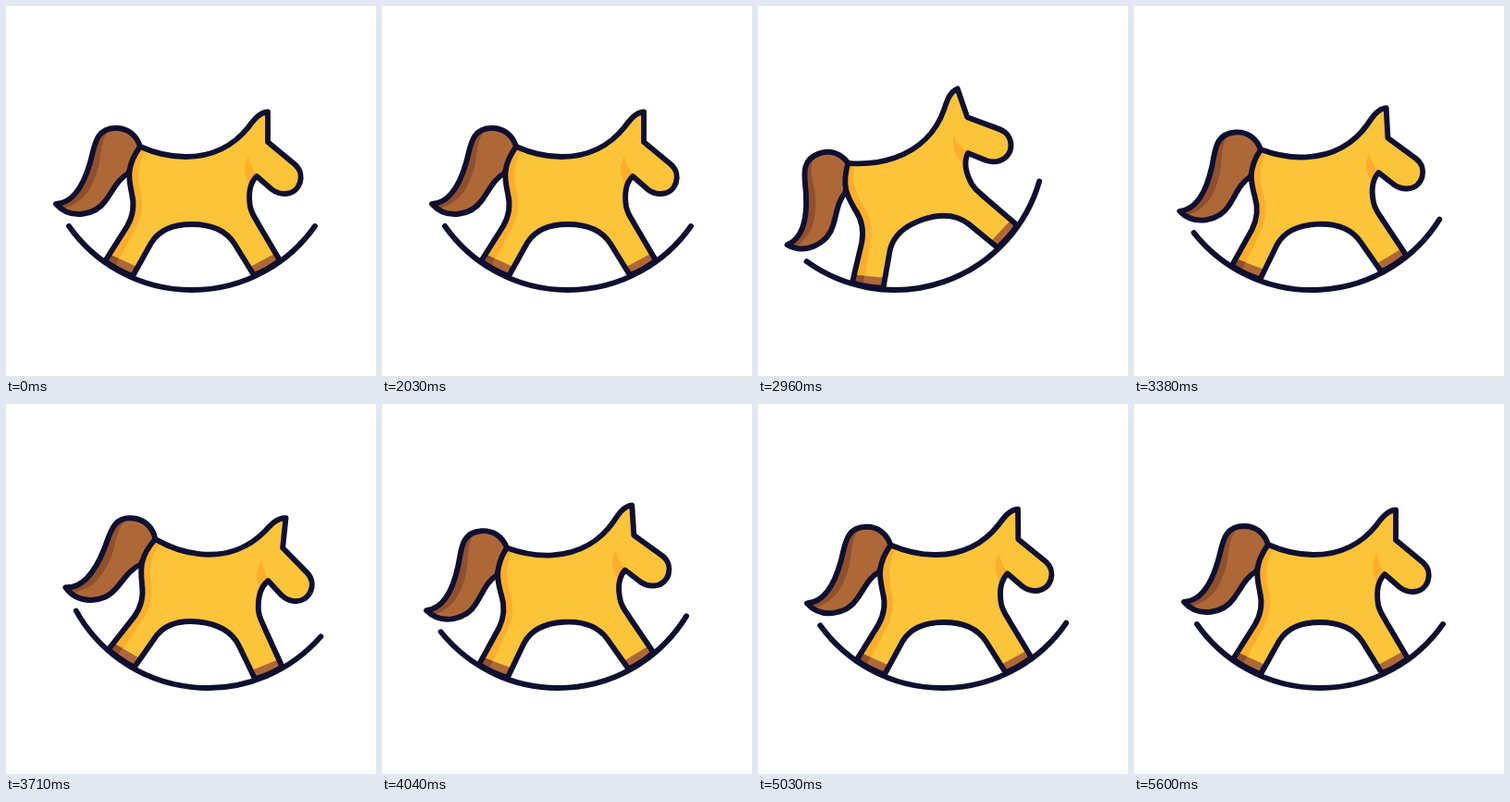
Animation, 400 px wide and 400 px high, one loop 5.66 s. Source, as an HTML page:

```html
<!DOCTYPE html>
<html lang="en">
<head>
<meta charset="utf-8">
<title>Rocking horse</title>
<style>
  html, body { margin: 0; width: 100%; height: 100%; overflow: hidden; background: #fff; }
  svg { display: block; width: 100%; height: 100%; }
  .line { fill: none; stroke: #0f0f30; stroke-width: 5.9; stroke-linecap: round; stroke-linejoin: round; }
</style>
</head>
<body>
<svg viewBox="0 0 400 400">
  <defs>
    <path id="tail" d="M54 214C75 213 85 190 91 169C96 152 96 132 119 132C131 132 141 139 145 152L132 181C121 187 116 199 108 210C97 226 70 232 54 214Z"/>
    <path id="body" d="M145 152C163 160 179 163 194 163C224 163 247 150 262 131C268 123 274 115 283 114.500V147L312 171C325 182 318 203 301 203C295 203 291 201 287 198L271 184C263 192 262 205 264 217C266 226 270 230 273 236L296 275Q283 285 268 291L247 257C238 243 222 236 201 236C180 236 165 243 157 256L137 292Q121 286 107 276L131 238C139 224 138 211 136 203C133 188 129 174 145 152Z"/>
    <clipPath id="inTail"><use href="#tail"/></clipPath>
    <clipPath id="inBody"><use href="#body"/></clipPath>
  </defs>
  <g id="horse">
    <use href="#tail" fill="#ae6838"/>
    <path clip-path="url(#inTail)" fill="#90502c" d="M50 205L85 150L113 133C100 146 104 164 99 178C92 199 84 214 58 220Z"/>
    <use href="#tail" class="line"/>
    <use href="#body" fill="#fcc438"/>
    <g clip-path="url(#inBody)">
      <path fill="#fbae2a" d="M154 152C141 168 142 186 146 203C150 222 143 236 136 248L115 288L90 270L120 150ZM262 162C255 176 258 187 264 194L272 184C267 177 264 171 262 162Z"/>
      <path fill="#ae6838" d="M111 268L142 282L136 300L98 285ZM292 267L262 283L268 300L305 280Z"/>
      <path fill="#90502c" d="M111 268L122 273L114 288L96 284Z"/>
    </g>
    <use href="#body" class="line"/>
    <path class="line" d="M68 238A162.700 162.700 0 0 0 334 238"/>
  </g>
</svg>
<script>
  const LOOP = 5660, CX = 201, CY = 144.3;
  // [time in ms, tilt in degrees, sideways roll] at each turning point
  const swings = [[0, 0, 0], [2015, 0, 0], [2461, 6.6, 18.6], [3050, -20.2, -56.5],
    [3618, 6.6, 18.6], [4198, -5.5, -16], [4643, 3.5, 8.4], [5140, -1, -2.8],
    [5600, 0, 0], [LOOP, 0, 0]];
  const horse = document.getElementById('horse');

  const ease = u => {
    const smooth = u * u * (3 - 2 * u);
    const smoother = u * u * u * (10 - 15 * u + 6 * u * u);
    return (smooth + smoother) / 2;
  };

  function poseAt(t) {
    const i = swings.findIndex(([time]) => time > t);
    const from = swings[i - 1], to = swings[i];
    const e = ease((t - from[0]) / (to[0] - from[0]));
    const mix = k => from[k] + (to[k] - from[k]) * e;
    return { tilt: mix(1), roll: mix(2) };
  }

  function draw(now) {
    const { tilt, roll } = poseAt(now % LOOP);
    horse.setAttribute('transform', `translate(${roll} 0) rotate(${tilt} ${CX} ${CY})`);
    requestAnimationFrame(() => draw(performance.now() - start));
  }

  const start = performance.now();
  draw(0);
</script>
</body>
</html>
```
